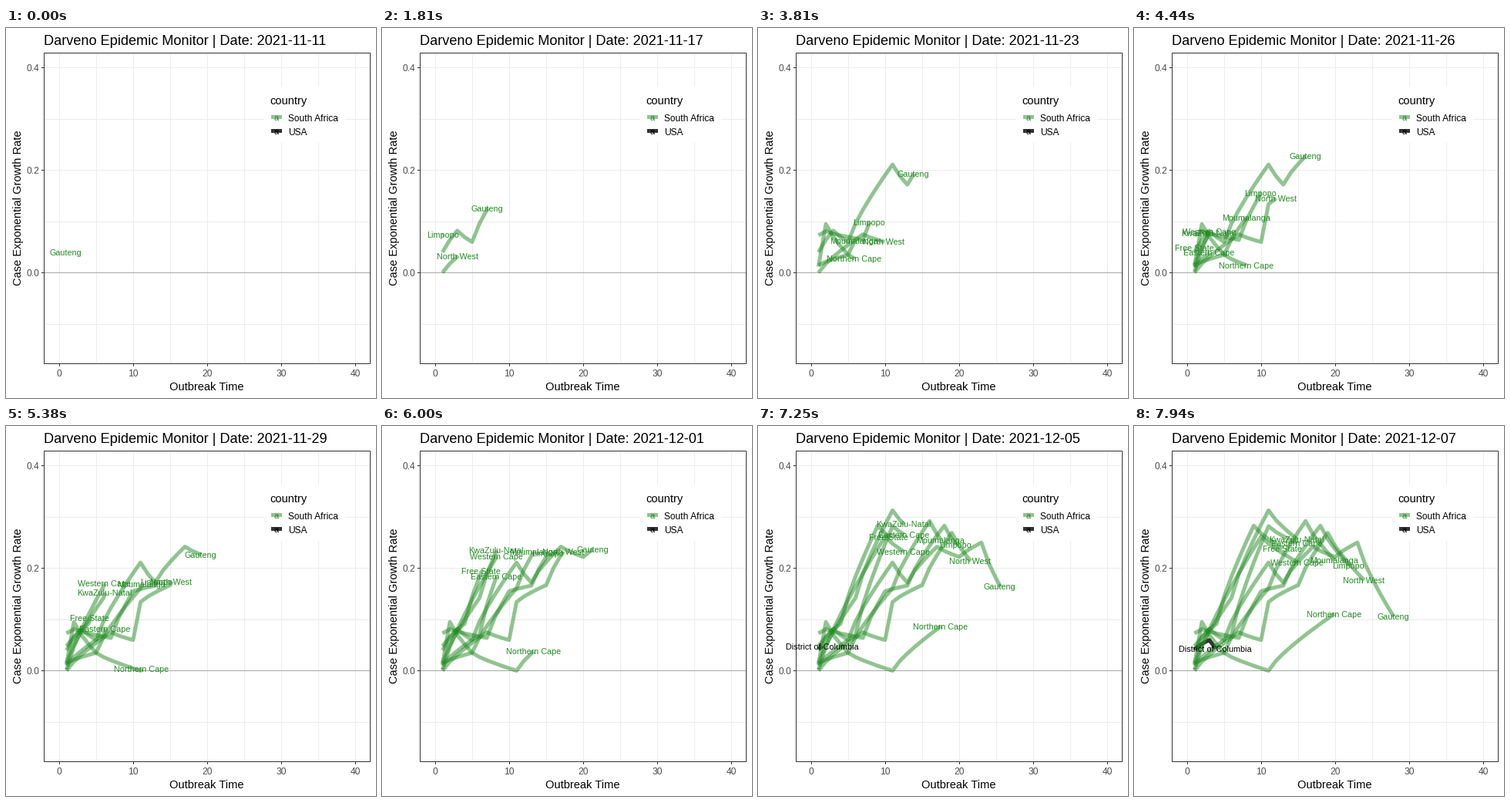
Write a matplotlib script that moves like this. It is 480 px wide and 480 px high and loops after 8000 ms.

```python
import matplotlib.pyplot as plt
import numpy as np
from matplotlib.animation import FuncAnimation
from matplotlib.patches import Rectangle

SIZE, DPI = 480, 100
LOOP_MS, TICK_MS = 8000, 25
STEP_MS = 62.5            # the chart moves on in steps of this length
DAYS_PER_STEP = 0.2118
LEFT, TOP, RIGHT, BOTTOM = 49.5, 32.5, 472.5, 435.5
GREEN, BLACK = "#228B22", "#000000"
GRID, DARK, TICK_TEXT = "#EBEBEB", "#333333", "#4D4D4D"

plt.rcParams["font.family"] = "Liberation Sans"
fig = plt.figure(figsize=(SIZE / DPI, SIZE / DPI), dpi=DPI, facecolor="white")
ax = fig.add_axes([0, 0, 1, 1])
ax.set_xlim(0, SIZE)
ax.set_ylim(SIZE, 0)
ax.axis("off")


def pt(px):
    return px * 72 / DPI


def px_x(t):
    return 68.8 + 9.61 * np.asarray(t, float)


def px_y(rate):
    return 317.5 - 665 * np.asarray(rate, float)


def text(x, y, s, px, color="black", ha="left", **kw):
    return ax.text(x, y, s, fontsize=pt(px), color=color, ha=ha,
                   va="baseline", **kw)


def stroke(xs, ys, color, width=1, z=1, **kw):
    return ax.plot(xs, ys, color=color, lw=pt(width), zorder=z, snap=False,
                   solid_capstyle="butt", solid_joinstyle="round", **kw)[0]


def box(x0, y0, x1, y1, **kw):
    return Rectangle((x0, y0), x1 - x0, y1 - y0, snap=False, **kw)


def draw_panel():
    for t in range(0, 41, 5):
        x = np.round(px_x(t)) + 0.5
        stroke([x, x], [TOP, BOTTOM], GRID)
        if t % 10 == 0:
            stroke([x, x], [BOTTOM, BOTTOM + 3.5], DARK)
            text(x - 0.5, 452, str(t), 12, TICK_TEXT, "center")
    for tenth in range(-1, 5):
        y = np.floor(px_y(tenth / 10)) + 0.5
        stroke([LEFT, RIGHT], [y, y], GRID)
        if tenth in (0, 2, 4):
            stroke([LEFT - 3.5, LEFT], [y, y], DARK)
            text(43.3, y + 4.8, f"{tenth / 10:.1f}", 12, TICK_TEXT, "right")
    stroke([LEFT, RIGHT], [317.5, 317.5], "#A9A9A9", z=2)
    ax.add_patch(box(LEFT, TOP, RIGHT, BOTTOM, fill=False, ec=DARK,
                     lw=pt(1), zorder=6))
    text(260.5, 470, "Outbreak Time", 14.67, ha="center")
    text(20, 233.5, "Case Exponential Growth Rate", 14.67, ha="center",
         rotation=90, rotation_mode="anchor")


def draw_legend():
    ax.add_patch(box(335, 76, 440, 149, fc="white", ec="none", zorder=7))
    text(342.5, 99, "country", 14.67, zorder=9)
    rows = [("South Africa", GREEN, 0.5, 115.5), ("USA", BLACK, 0.8, 133.5)]
    for name, color, alpha, y in rows:
        stroke([344, 358], [y, y], color, 5, 8, alpha=alpha)
        text(351, y + 5, "a", 10.7, color, "center", zorder=9)
        text(366.5, y + 5.5, name, 12, zorder=9)


def growth(turns):
    """Daily rates that run from turn to turn, each leg slowing a little."""
    t, rate = np.array(turns, float).T
    days = np.arange(1, t[-1] + 1)
    leg = np.clip(np.searchsorted(t, days, "right") - 1, 0, len(t) - 2)
    u = (days - t[leg]) / (t[leg + 1] - t[leg])
    return days, rate[leg] + (rate[leg + 1] - rate[leg]) * u ** 0.8


class Region:
    """A growth curve whose label rides on its tip."""

    def __init__(self, name, start, *turns, color=GREEN, alpha=0.5):
        self.start = start
        self.days, self.rates = growth(turns)
        self.line = stroke([], [], color, 5, 3, alpha=alpha)
        self.label = text(0, 0, name, 10.7, color, "center", zorder=5)
        panel = box(LEFT, TOP, RIGHT, BOTTOM, transform=ax.transData)
        for artist in (self.line, self.label):
            artist.set_clip_path(panel)

    def show(self, day):
        now = min(1 + day - self.start, self.days[-1])
        for artist in (self.line, self.label):
            artist.set_visible(now >= 1)
        past = self.days < now
        tip = np.interp(now, self.days, self.rates)
        self.line.set_data(px_x(np.append(self.days[past], now)),
                           px_y(np.append(self.rates[past], tip)))
        self.label.set_position((px_x(now) - 0.8, px_y(tip) + 4))


draw_panel()
draw_legend()
title = text(49, 22, "", 18.2)

# name, first day, then the turning points as (outbreak time, rate)
regions = [
    Region("District of Columbia", 24, (1, .042), (3, .06), (4, .041),
           color=BLACK, alpha=0.8),
    Region("Eastern Cape", 13, (1, .01), (6, .07), (11, .282), (15, .248)),
    Region("Free State", 15, (1, .048), (4, .092), (9, .283), (13, .237)),
    Region("Gauteng", 0, (1, .04), (3, .082), (5, .06), (11, .211),
           (13, .172), (17, .242), (20, .222), (23, .25), (28, .103)),
    Region("KwaZulu-Natal", 13, (1, .015), (6, .142), (11, .313), (15, .255)),
    Region("Limpopo", 6, (1, .073), (2, .081), (7, .064), (10, .155),
           (13, .166), (18, .283), (22, .203)),
    Region("Mpumalanga", 8, (1, .015), (5, .035), (11, .161), (16, .292),
           (20, .214)),
    Region("Northern Cape", 8, (1, .012), (2, .095), (5, .035), (11, 0),
           (20, .112)),
    Region("North West", 4, (1, 0), (7, .075), (10, .06), (11, .134),
           (15, .167), (19, .269), (24, .175)),
    Region("Western Cape", 13, (1, .002), (10, .262), (15, .211)),
]


def date_text(day):
    month, d = divmod(10 + int(day), 30)
    return f"2021-{11 + month}-{d + 1:02d}"


def update(frame):
    # steps begin on a 10 ms clock, so look a little past the tick
    step = int((frame * TICK_MS + 15) / STEP_MS)
    day = step * DAYS_PER_STEP
    title.set_text(f"Darveno Epidemic Monitor | Date: {date_text(day)}")
    for region in regions:
        region.show(day)
    return []


anim = FuncAnimation(fig, update, frames=LOOP_MS // TICK_MS, interval=TICK_MS,
                     init_func=lambda: update(0), repeat=True, repeat_delay=0)
plt.show()
```
